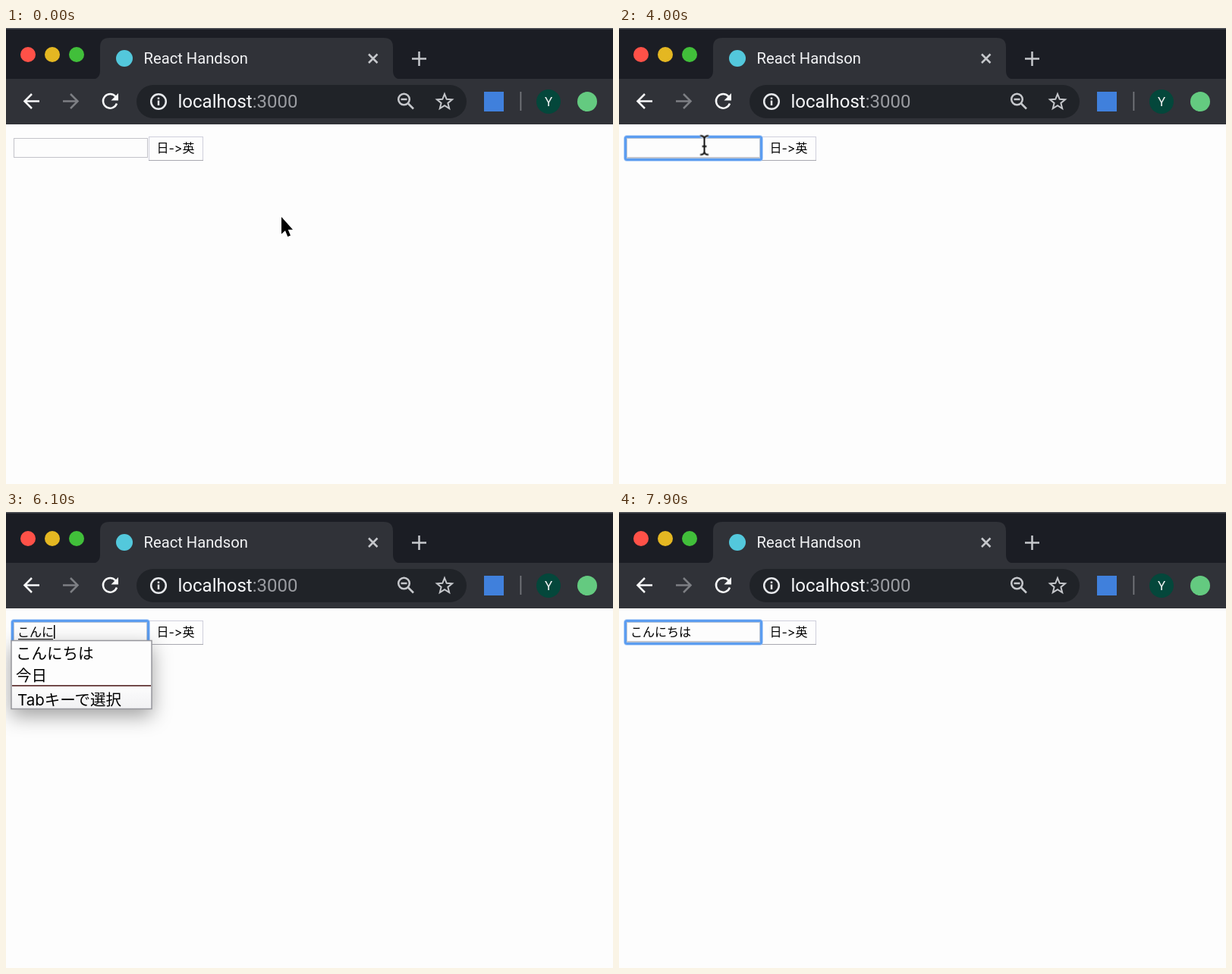
Animation of 800 by 601 pixels, one loop 8 s. Source, as an HTML page:

```html
<!DOCTYPE html>
<html lang="ja">
<head>
<meta charset="utf-8">
<title>React Handson</title>
<style>
  html, body { margin: 0; width: 100%; height: 100%; overflow: hidden; background: #fdfdfd; }
  svg { display: block; width: 800px; height: 601px; }
  text { font-family: Roboto, "Noto Sans CJK JP", "Noto Sans CJK", sans-serif; }
  .line { fill: none; stroke-width: 2.5; }
  .button-text { font: 16px Inter, "Noto Sans CJK JP", "Noto Sans CJK", sans-serif; font-feature-settings: "calt" 0; }
  .popup { filter: drop-shadow(0 9px 13px rgba(0, 0, 0, .36)); visibility: hidden; }
  .popup text { font: 20.5px Inter, "Noto Sans CJK JP", "Noto Sans CJK", sans-serif; }
  .popup .note { font-size: 17.5px; fill: #96969b; }
  .typed { font-size: 16px; }

  #arrow { animation: arrow 8s infinite, arrow-shown 8s step-end infinite; }
  #beam { animation: beam 8s infinite, beam-shown 8s step-end infinite; }
  #focus { animation: focus-shown 8s step-end infinite; }
  .ring { animation: settle 8s linear infinite; }

  @keyframes arrow {
    0%, 8% { transform: translate(363px, 249px); animation-timing-function: ease-in; }
    11.25% { transform: translate(325px, 216px); animation-timing-function: linear; }
    14.5%, 100% { transform: translate(165px, 172px); }
  }
  @keyframes arrow-shown { 0% { opacity: 1; } 14.5%, 100% { opacity: 0; } }
  @keyframes beam {
    0%, 14.5% { transform: translate(150px, 165px); }
    16.25%, 18% { transform: translate(124px, 160.5px); }
    21.5%, 100% { transform: translate(112.5px, 154.5px); }
  }
  @keyframes beam-shown { 0% { opacity: 0; } 14.5% { opacity: 1; } 66.4%, 100% { opacity: 0; } }
  @keyframes focus-shown { 0% { opacity: 0; } 43.7%, 100% { opacity: 1; } }
  @keyframes settle {
    0%, 43.7% { x: .5px; y: 135.5px; width: 195px; height: 46px; }
    46.2%, 100% { x: 8.5px; y: 143.5px; width: 179px; height: 30px; }
  }
</style>
</head>
<body>
<svg viewBox="0 0 800 601">
  <defs>
    <path id="i-beam" d="M-5.5-12.5Q0-12.5 0-8Q0-12.5 5.5-12.5M0-9V9M-5.5 12.5Q0 12.5 0 8Q0 12.5 5.5 12.5M-3 1.5H3"/>
    <linearGradient id="sheet" x2="0" y2="1">
      <stop offset=".65" stop-color="#fdfdfd"/>
      <stop offset="1" stop-color="#f1f1f3"/>
    </linearGradient>
  </defs>
  <rect width="800" height="601" fill="#fdfdfd"/>

  <!-- tab strip -->
  <rect width="800" height="68" fill="#1b1d24"/>
  <rect width="800" height="1.5" fill="#55575c"/>
  <path d="M112 68Q124 68 124 56V25Q124 13 136 13H498Q510 13 510 25V56Q510 68 522 68Z" fill="#303238"/>
  <rect y="67" width="800" height="60" fill="#303238"/>
  <circle cx="29" cy="35" r="10" fill="#ff5148"/>
  <circle cx="61" cy="35" r="10" fill="#e4b722"/>
  <circle cx="93" cy="35" r="10" fill="#41bf3a"/>
  <circle cx="156" cy="40" r="11" fill="#53c8dc"/>
  <text x="181.5" y="47" font-size="20.2" fill="#f3f4f6">React Handson</text>
  <path class="line" d="M478 34.5l11.5 11.5m0-11.5l-11.5 11.5" stroke="#c6c8cc" stroke-width="2"/>
  <path class="line" d="M535 40.5h19m-9.5-9.5v19" stroke="#c6c8cc"/>

  <!-- toolbar -->
  <path class="line" d="M44 96.500H24.5M34 87l-9.5 9.5 9.5 9.5" stroke="#f8f9fa"/>
  <path class="line" d="M75 96.500H94.5M85 87l9.5 9.5-9.5 9.5" stroke="#7d7f84"/>
  <path class="line" d="M144.5 90.5A9.3 9.3 0 1 0 146 99.5" stroke="#f8f9fa"/>
  <path d="M148 86v9.5h-9.5z" fill="#f8f9fa"/>
  <rect x="172" y="75" width="435" height="44" rx="22" fill="#202328"/>
  <circle class="line" cx="201" cy="97" r="9.8" stroke="#e6e8eb"/>
  <path class="line" d="M201 95.5v6.5m0-10.5v2.5" stroke="#e6e8eb"/>
  <text x="226.5" y="105" font-size="24" fill="#f6f7f9">localhost<tspan fill="#9a9ca1">:3000</tspan></text>
  <g class="line" stroke="#c6c8cc">
    <circle cx="524.5" cy="94" r="7.3"/>
    <path d="M530 99.5l7 7M520.5 94h8"/>
    <path id="star" stroke-width="2"/>
  </g>
  <rect x="630" y="84" width="26" height="26" fill="#4080dc"/>
  <rect x="677.5" y="84" width="1.8" height="25" fill="#73757a"/>
  <circle cx="715" cy="97" r="16" fill="#04473b"/>
  <text x="715" y="103" font-size="17" text-anchor="middle" fill="#f4f5f6">Y</text>
  <circle cx="766" cy="97" r="13" fill="#64ca80"/>

  <!-- form -->
  <rect x="10.5" y="145.5" width="176" height="25" fill="#fdfdfd" stroke="#c3c3c9"/>
  <rect x="188.5" y="143.5" width="71" height="31" fill="#fdfdfd" stroke="#cfcfdc"/>
  <path d="M188 174.5h72" stroke="#a9a9b0"/>
  <text class="button-text" x="198.5" y="164">日-&gt;英</text>
  <g id="focus" fill="none">
    <rect class="ring" rx="2" stroke="#9cc3f8" stroke-width="5" opacity=".6"/>
    <rect class="ring" rx="2" stroke="#5c9df0" stroke-width="3.2"/>
    <rect x="10.5" y="145.5" width="175" height="26" stroke="#bcc6d4"/>
  </g>
  <text id="typed" class="typed" x="15" y="164"></text>
  <rect id="underline" x="16" y="167" height="1.3" fill="#222"/>
  <rect id="caret" y="149" width="1.5" height="18"/>
  <g id="popups"></g>

  <!-- pointers -->
  <g id="arrow">
    <path d="M0 0V22.5L5 18 8.3 26 12 24.4 8.7 16.7H15Z" stroke="#fdfdfd" stroke-width="3" stroke-linejoin="round" paint-order="stroke"/>
  </g>
  <g id="beam" fill="none">
    <use href="#i-beam" stroke="#fdfdfd" stroke-width="4"/>
    <use href="#i-beam" stroke="#111" stroke-width="2"/>
  </g>
</svg>
<script>
const $ = id => document.getElementById(id);

const starPoints = Array.from({ length: 10 }, (_, i) => {
  const r = i % 2 ? 4.6 : 10.5, a = (i * 36 - 90) * Math.PI / 180;
  return `${(578 + r * Math.cos(a)).toFixed(1)} ${(97.5 + r * Math.sin(a)).toFixed(1)}`;
});
$('star').setAttribute('d', `M${starPoints.join('L')}Z`);

// Candidate window of the input method
function popup(rows, width, note = '') {
  const end = 170 + rows.length * 29;
  const items = rows.map((row, i) => `<text x="13" y="${194.3 + i * 29}">${row}</text>`).join('');
  return `<g class="popup">
    <rect x="7" y="169.5" width="${width}" height="${end - 138}" fill="url(#sheet)" stroke="#96969c" stroke-width="1.5"/>
    ${items}<text class="note" x="129" y="250">${note}</text>
    <rect x="8" y="${end}" width="${width - 2}" height="1.8" fill="#643838"/>
    <text x="15" y="${end + 26.5}">Tabキーで選択</text></g>`;
}
$('popups').innerHTML =
  popup(['こんにちは', '今回は', 'この'], 206, 'ひらがな') +
  popup(['こんにちは', '今日'], 185);
const popups = [...$('popups').children];

// Time in ms, text, index of the open candidate window
const LOOP = 8000, FOCUS = 3500, COMMIT = 6950;
const keys = [
  [0, '', -1],
  [5330, 'ｋ', 0], [5520, 'こ', 0], [5690, 'こｎ', 0], [5870, 'こん', 0],
  [5980, 'こんｎ', 0], [6070, 'こんに', 1], [6180, 'こんにｃ', 1],
  [6290, 'こんにｃｈ', 1], [6390, 'こんにち', 1], [6520, 'こんにちｈ', 1],
  [6690, 'こんにちは', 1], [COMMIT, 'こんにちは', -1]
];

function draw(t) {
  const [, text, open] = keys.findLast(key => key[0] <= t);
  const width = text.length * 16;
  const blinkFrom = t < COMMIT ? FOCUS : COMMIT;
  const caretOn = open >= 0 || (t >= FOCUS && (t - blinkFrom) % 1000 < 500);
  $('typed').textContent = text;
  $('underline').setAttribute('width', open < 0 ? 0 : width - 2);
  $('caret').setAttribute('x', 15 + width);
  $('caret').style.visibility = caretOn ? 'visible' : 'hidden';
  popups.forEach((box, i) => { box.style.visibility = i === open ? 'visible' : 'hidden'; });
}

const start = performance.now();
function tick() {
  draw((performance.now() - start) % LOOP);
  requestAnimationFrame(tick);
}
tick();
</script>
</body>
</html>
```
